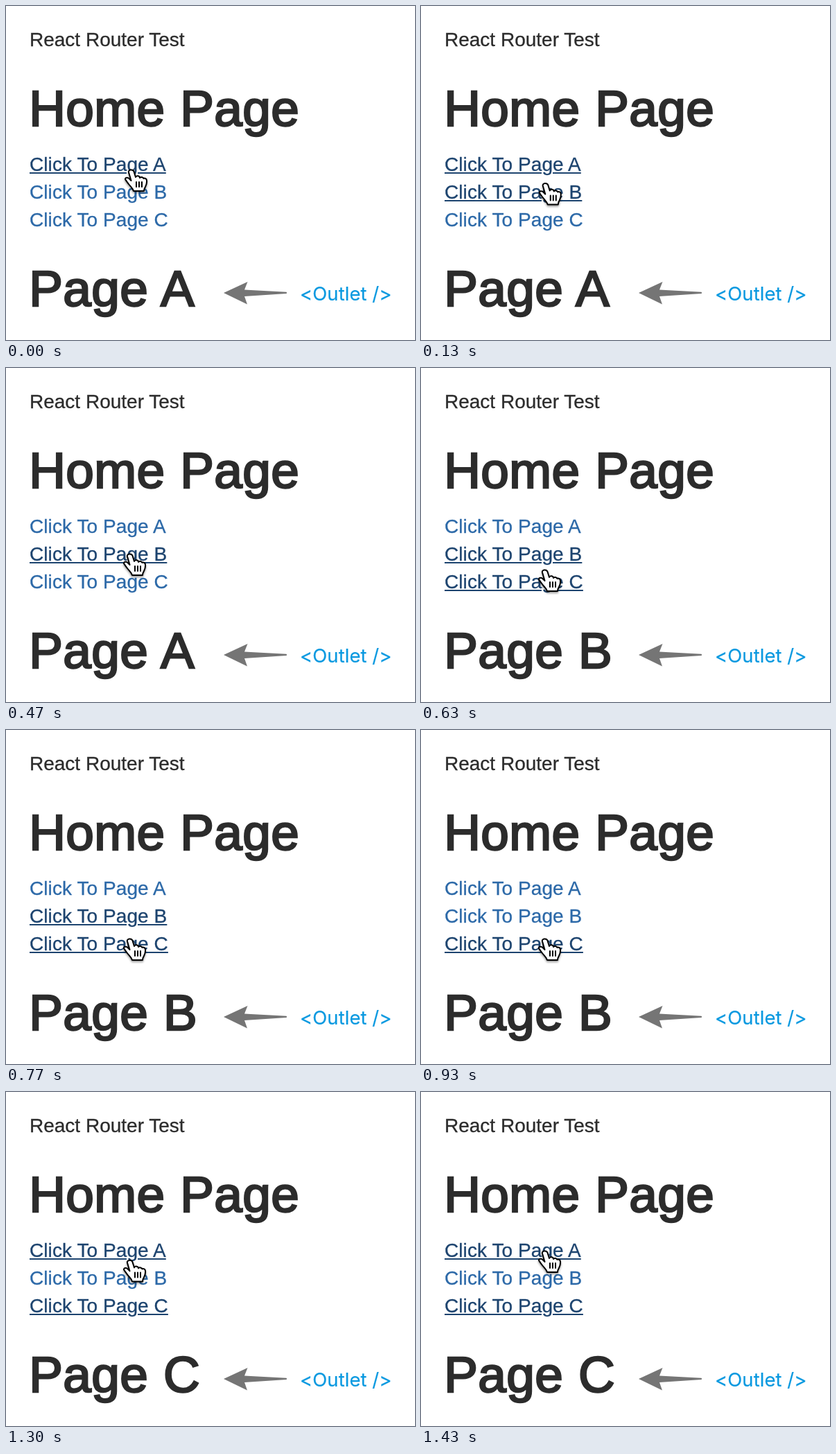
An HTML page that plays this animation: 590x482 px, repeating every 1.46 s.

```html
<!DOCTYPE html>
<html lang="en">
<head>
<meta charset="utf-8">
<title>React Router Test</title>
<style>
  html, body { margin: 0; width: 100%; height: 100%; overflow: hidden; background: #fff; }
  #stage {
    position: relative; width: 590px; height: 482px; overflow: hidden;
    font: 28px/31px "Liberation Sans", Arial, sans-serif; color: #2c2c2c;
  }
  #stage > * { position: absolute; margin: 0; white-space: pre; }
  .intro, .link { left: 34px; -webkit-text-stroke: .3px currentColor; }
  .intro { top: 33px; }
  h1 {
    left: 33.2px; font-size: 73px; line-height: 82px; font-weight: 400;
    letter-spacing: .4px; word-spacing: 1px; -webkit-text-stroke: 2.5px currentColor;
  }
  .link { color: #2c69a8; letter-spacing: .08px; }
  .link.on {
    color: #1d446f;
    text-decoration: underline; text-decoration-thickness: 2px; text-underline-offset: 2px;
  }
  .outlet {
    left: 424px; top: 399px; color: #0a99e0;
    font: 27.5px/33px Inter, sans-serif; letter-spacing: .05px;
    -webkit-text-stroke: .2px currentColor;
  }
  svg { left: 0; top: 0; }
  .cursor { filter: drop-shadow(0 2px 1.5px rgba(0, 0, 0, .4)); }
</style>
</head>
<body>
<div id="stage">
  <div class="intro">React Router Test</div>
  <h1 style="top:107px">Home Page</h1>
  <div class="link" style="top:213px">Click To Page A</div>
  <div class="link" style="top:253px">Click To Page B</div>
  <div class="link" style="top:293px">Click To Page C</div>
  <h1 id="page" style="top:367px">Page A</h1>
  <div class="outlet">&lt;Outlet /&gt;</div>
  <svg width="590" height="482">
    <path fill="#757575" d="M314 414L348.5 398L344 409.5L404.5 412.8Q406 414 404.5 415L344 419L348 430.5Z"/>
    <g id="hand" class="cursor" stroke="#000" stroke-width="2" stroke-linejoin="round" stroke-linecap="round">
      <path fill="#fff" d="M-5 4C-6 0 1 -1 2.500 3L5 11C6 8 11 9 11 12
        C12 10 16 11 16.500 13C18 12 21 13 21 16C21.500 20 20 23 19 25
        C17.500 27.500 17 28 17 31H2C1 27 -2 25 -5 21C-7 18 -9 16 -10 14
        C-10 11 -6 11 -4 13.500L-1.500 16Z"/>
      <path fill="none" d="M6 18V25M10 18V25M14 18V25"/>
    </g>
    <path id="arrow" class="cursor" stroke="#fff" stroke-width="2" stroke-linejoin="round"
      d="M1 2V27L6.500 22L11 33L15.500 31L11 20.500H20Z"/>
  </svg>
</div>
<script>
const LOOP = 1460;
const PRESS = 80; // a link takes focus this long before its page shows
const clicks = [500, 1000];

// pointer glides, each slowing to a stop on its link
const glides = [
  { start: 30, end: 300, from: [182, 237], to: [180, 269] },
  { start: 570, end: 730, from: [180, 276], to: [180, 302] },
  { start: 1170, end: 1430, from: [180, 284.5], to: [180, 230] }
];

const $ = id => document.getElementById(id);
const links = [...document.querySelectorAll(".link")];
const easeOut = u => 1 - (1 - u) ** 2;
const clicked = t => clicks.filter(c => c <= t).length;

function pointer(t) {
  const { start, end, from, to } = glides.findLast(g => g.start <= t) || glides[0];
  const k = easeOut(Math.min(1, Math.max(0, (t - start) / (end - start))));
  return from.map((v, i) => v + (to[i] - v) * k);
}

// links are 33px tall, 40px apart
function hovered(y) {
  const d = y - 211;
  return d % 40 <= 33 ? Math.floor(d / 40) : -1;
}

function place(el, x, y, visible) {
  el.setAttribute("transform", `translate(${x} ${y})`);
  el.style.display = visible ? "" : "none";
}

function draw(t) {
  const [x, y] = pointer(t);
  const over = hovered(y), focused = clicked(t + PRESS);
  links.forEach((link, i) => link.classList.toggle("on", i === over || i === focused));
  $("page").textContent = "Page " + "ABC"[clicked(t)];
  place($("hand"), x, y - 1, over >= 0);
  place($("arrow"), x - 2, y - 3.5, over < 0);
}

const start = performance.now();
function tick() {
  draw((performance.now() - start) % LOOP);
  requestAnimationFrame(tick);
}
tick();
</script>
</body>
</html>
```
